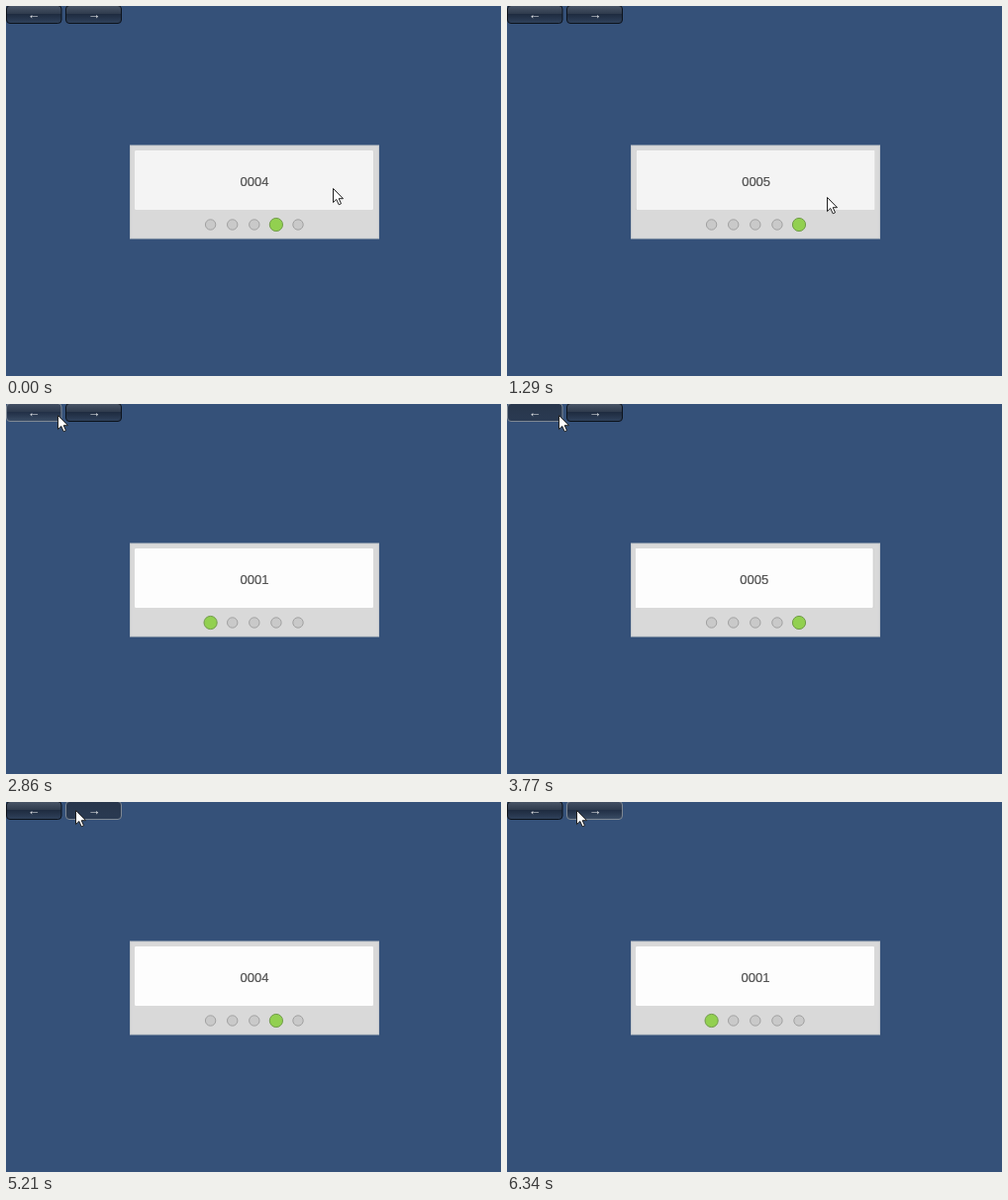
These frames come from a looping animation (500x374 px, 6.76 s). An HTML page:

```html
<!DOCTYPE html>
<html lang="en">
<head>
<meta charset="utf-8">
<title>Looping pager</title>
<style>
  html, body { margin: 0; width: 100%; height: 100%; overflow: hidden; background: #355179; }
  svg { display: block; width: 500px; height: 374px; }
  text { font-family: "Liberation Sans", Arial, sans-serif; font-size: 13px; text-anchor: middle; }
  .card text { fill: #505050; stroke: #505050; stroke-width: .2; }
  .button rect { fill: url(#idle); stroke: #0c121b; }
  .button text { fill: #e6e8ea; }
  .button.hover rect { stroke: #7e8894; fill: url(#lit); }
  .button.down rect { fill: url(#pressed); }
  .dot { fill: #c9c9c9; stroke: #a2a2a2; }
  .dot.on { fill: #92d050; stroke: #729b4c; }
</style>
</head>
<body>
<svg id="stage" viewBox="0 0 500 374">
  <defs>
    <linearGradient id="idle" x2="0" y2="1">
      <stop offset="0" stop-color="#4a5668"/><stop offset=".45" stop-color="#303c4e"/>
      <stop offset=".5" stop-color="#1f2c40"/><stop offset="1" stop-color="#30425c"/>
    </linearGradient>
    <linearGradient id="lit" x2="0" y2="1">
      <stop offset="0" stop-color="#445064"/><stop offset=".45" stop-color="#2e3b4f"/>
      <stop offset=".5" stop-color="#223047"/><stop offset="1" stop-color="#3b4d66"/>
    </linearGradient>
    <linearGradient id="pressed" x2="0" y2="1">
      <stop offset="0" stop-color="#28364b"/><stop offset="1" stop-color="#2a3a52"/>
    </linearGradient>
    <clipPath id="view"><rect x="130" y="146" width="241.5" height="60"/></clipPath>
  </defs>
  <rect width="500" height="374" fill="#355179"/>
  <g class="button"><rect x=".5" y="-.5" width="55.5" height="18" rx="3.5"/><text x="28" y="13">←</text></g>
  <g class="button"><rect x="60.5" y="-.5" width="56" height="18" rx="3.5"/><text x="89" y="13">→</text></g>
  <rect x="125.5" y="141" width="251" height="94" fill="#d9d9d9" stroke="#c3c7cb"/>
  <g id="cards" clip-path="url(#view)"></g>
  <g id="dots"></g>
  <path id="cursor" d="M.5 .5V14.6L3.8 11.5L6.2 16.8L8.5 15.8L6.2 10.7H10.5Z" fill="#fff" stroke="#222" stroke-width="1"/>
</svg>
<script>
const LOOP = 6760, PAGES = 5, PITCH = 259, DECAY = 0.012;

// Pointer path: time, x, y, and the easing used to arrive there
const linear = u => u;
const smooth = u => u * u * (3 - 2 * u);
const speedUp = u => u ** 1.4;
const path = [
  [490, 330, 184, linear],
  [860, 178, 168, smooth],
  [950, 178, 168, linear],
  [1290, 323, 193, smooth],
  [1340, 323, 193, linear],
  [1920, 170, 161, speedUp],
  [2130, 170, 161, linear],
  [2380, 110, 137, speedUp],
  [2560, 63, 69, linear],
  [2680, 55, 32, linear],
  [2860, 52, 11, smooth],
  [4590, 52, 11, linear],
  [4760, 70, 8, smooth]
];

// Settling slides: start, page left, page reached
const slides = [
  [860, 3.57, 4], [1970, 4.575, 5], [3330, 5, 4],
  [3820, 4, 3], [5300, 3, 4], [5640, 4, 5]
];
const hovers = [[2790, 4650], [4690, LOOP]];
const presses = [[[3280, 3330], [3770, 3820]], [[5210, 5300], [5550, 5640]]];

const within = (t, [from, to]) => t >= from && t < to;

function pointer(t) {
  const i = path.findIndex(p => p[0] > t);
  if (i < 0) return path.at(-1).slice(1, 3);
  if (i === 0) return path[0].slice(1, 3);
  const [t0, x0, y0] = path[i - 1], [t1, x1, y1, ease] = path[i];
  const u = ease((t - t0) / (t1 - t0));
  return [x0 + (x1 - x0) * u, y0 + (y1 - y0) * u];
}

function position(t, x) {
  if (within(t, [0, 860])) return 3 + Math.max(0, 326 - x) / PITCH;
  if (within(t, [1340, 1970])) return 4 + Math.max(0, 319 - x) / PITCH;
  const [start, from, to] = slides.findLast(s => s[0] <= t);
  return to + (from - to) * Math.exp(-DECAY * (t - start));
}

const byId = id => document.getElementById(id);
const indices = [...Array(PAGES).keys()];
byId("cards").innerHTML = indices.map(i => `<g class="card">
  <rect x="129.5" y="145.5" width="242" height="61" rx="1.5" stroke="#cdcdcd"/>
  <text x="251" y="181.6">000${i + 1}</text></g>`).join("");
byId("dots").innerHTML = indices.map(i =>
  `<circle class="dot" cx="${206.6 + i * 22.1}" cy="221"/>`).join("");

const cards = [...document.querySelectorAll(".card")];
const dots = [...document.querySelectorAll(".dot")];
const buttons = [...document.querySelectorAll(".button")];
const cursor = byId("cursor");

function draw(t) {
  const [x, y] = pointer(t);
  const pos = position(t, x);
  const current = Math.round(pos) % PAGES;

  cards.forEach((card, i) => {
    const turn = (i - pos + 2.5 + 2 * PAGES) % PAGES - 2.5;
    card.setAttribute("transform", `translate(${turn * PITCH})`);
    const bright = t >= 2100 || (i === 0 && t >= 1880);
    card.firstElementChild.setAttribute("fill", bright ? "#fdfdfd" : "#f4f4f4");
  });
  dots.forEach((dot, i) => {
    dot.classList.toggle("on", i === current);
    dot.setAttribute("r", i === current ? 6.6 : 5.2);
  });
  buttons.forEach((button, i) => {
    button.classList.toggle("hover", within(t, hovers[i]));
    button.classList.toggle("down", presses[i].some(p => within(t, p)));
  });
  cursor.setAttribute("transform", `translate(${Math.round(x)} ${Math.round(y)})`);
}

const begin = performance.now();
function tick() {
  draw((performance.now() - begin) % LOOP);
  requestAnimationFrame(tick);
}
tick();
</script>
</body>
</html>
```
